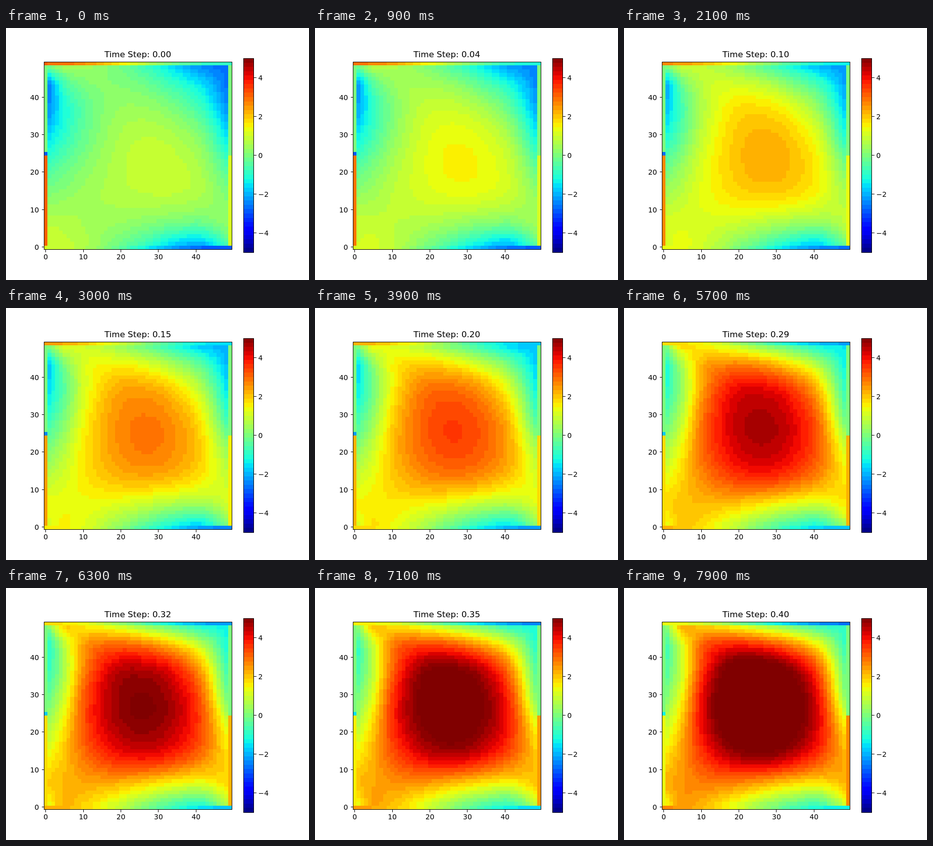
An HTML page with a canvas that plays this animation: 600x500 px, repeating every 8 s.

```html
<!DOCTYPE html>
<html lang="en">
<head>
<meta charset="utf-8">
<title>Heat map over time</title>
<style>
  html, body { margin: 0; width: 100%; height: 100%; overflow: hidden; background: #fff; }
  canvas, svg { position: absolute; left: 0; top: 0; }
  text { font: 13.89px "DejaVu Sans", sans-serif; }
  #title { font-size: 16.67px; text-anchor: middle; }
  path { fill: none; stroke: #000; shape-rendering: crispEdges; }
</style>
</head>
<body>
<canvas id="map" width="600" height="500"></canvas>
<svg id="axes" width="600" height="500">
  <path d="M75.5 67.5H447.5V439.5H75.5Z M470.5 60.5H490.5V445.5H470.5Z"/>
  <text id="title" x="261" y="58"></text>
</svg>
<script>
const SIZE = 50, CELL = 7.44, LEFT = 75, TOP = 67;
const STEP_MS = 100, STEPS = 80, DT = 0.005, END = 0.395;
const BANDS = 45;

// Interior values at the knots; rows run from the bottom up.
const KNOTS = [1, 4, 10, 18, 26, 34, 42, 48];
const ROWS = [1, 6, 13, 22, 30, 38, 44, 48];
const START_FIELD = [
  [0.95, 0.9, 0.65, 0, -0.7, -1.6, -1.9, -0.6],
  [0.75, 0.72, 0.55, 0.35, 0.1, -0.2, -0.3, 0.2],
  [0.2, 0.27, 0.47, 0.6, 0.7, 0.7, 0.5, 0.1],
  [-0.7, -0.4, 0.1, 0.62, 0.95, 0.88, 0.42, -0.6],
  [-1.6, -1.1, -0.3, 0.45, 0.75, 0.58, -0.1, -1.5],
  [-2.3, -1.4, -0.4, 0.25, 0.3, -0.1, -1, -2.3],
  [-2.2, -0.9, 0, 0.1, -0.2, -0.9, -1.7, -2.6],
  [-0.2, 0.3, 0.4, 0, -0.7, -1.6, -2.4, -2.7]
];
const END_FIELD = [
  [1.5, 2.4, 2.2, 1.4, 0.5, -0.2, -0.5, 1],
  [2.2, 2.45, 2.7, 2.6, 2.2, 1.7, 1.5, 2.1],
  [1.8, 2.3, 3.4, 4.4, 4.7, 4.2, 3.2, 2.2],
  [0.9, 1.8, 4, 5.5, 5.95, 5.4, 3.9, 1.6],
  [0.1, 1.1, 3.9, 5.7, 6.1, 5.5, 3.6, 0.3],
  [-0.5, 0.6, 3.3, 5.15, 5.35, 4.6, 2.6, -0.3],
  [-0.5, 0.9, 2.9, 3.5, 3.25, 2.4, 1, -0.8],
  [0.2, 1.9, 2, 1.6, 0.9, 0.2, -0.7, -1]
];

// Cubic Hermite curve through unevenly spaced points.
function spline(xs, vs, x) {
  const last = xs.length - 1;
  let i = 0;
  while (i < last - 1 && x > xs[i + 1]) i++;
  const slope = j => (vs[j + 1] - vs[j]) / (xs[j + 1] - xs[j]);
  const tangent = j => {
    if (j === 0) return slope(0);
    if (j === last) return slope(last - 1);
    const a = xs[j] - xs[j - 1], b = xs[j + 1] - xs[j];
    return (slope(j - 1) * b + slope(j) * a) / (a + b);
  };
  const h = xs[i + 1] - xs[i], s = (x - xs[i]) / h, r = 1 - s;
  return r * r * ((1 + 2 * s) * vs[i] + s * h * tangent(i)) +
         s * s * ((1 + 2 * r) * vs[i + 1] - r * h * tangent(i + 1));
}

function expand(field) {
  return Array.from({ length: SIZE }, (_, y) =>
    Array.from({ length: SIZE }, (_, x) =>
      spline(ROWS, field.map(row => spline(KNOTS, row, x)), y)));
}
const first = expand(START_FIELD), final = expand(END_FIELD);

function valueAt(x, y, t) {
  const wave = 2 * Math.cos(Math.PI * x / (SIZE - 1));
  if (y === SIZE - 1) return 1 + wave - 4 * t;
  if (y === 0) return -1 + wave + 4 * t;
  if (x === 0) return y < 25 ? 3 - 4 * t : y === 25 ? -3 + 4 * t : 0;
  if (x === SIZE - 1) return y < 25 ? 1 + 4 * t : 0;
  return first[y][x] + (final[y][x] - first[y][x]) * t / END;
}

// Piecewise linear rainbow from dark blue to dark red.
function jet(n) {
  const ramp = (a, b) => Math.max(0, Math.min(1, (n - a) / (b - a)));
  const r = ramp(0.35, 0.66) - 0.5 * ramp(0.89, 1);
  const g = ramp(0.125, 0.375) - ramp(0.64, 0.91);
  const b = 0.5 + 0.5 * ramp(0, 0.11) - ramp(0.34, 0.65);
  return `rgb(${[r, g, b].map(c => Math.round(255 * Math.max(0, c)))})`;
}
const palette = Array.from({ length: BANDS }, (_, i) => jet((i + 0.5) / BANDS));

function colour(v) {
  if (v >= 5) return jet(1);
  return palette[Math.max(0, Math.floor((v + 5) / 10 * BANDS))];
}

const ctx = document.getElementById("map").getContext("2d");
const axes = document.getElementById("axes");
const title = document.getElementById("title");

function box(x0, y0, x1, y1, fill) {
  const [a, b, c, d] = [x0, y0, x1, y1].map(Math.round);
  ctx.fillStyle = fill;
  ctx.fillRect(a, b, c - a, d - b);
}

function add(name, attrs, content = "") {
  const el = document.createElementNS("http://www.w3.org/2000/svg", name);
  for (const key in attrs) el.setAttribute(key, attrs[key]);
  el.textContent = content;
  axes.append(el);
}

function label(x, y, anchor, content) {
  add("text", { x, y, "text-anchor": anchor }, content);
}

function drawAxes() {
  for (let n = 0; n < SIZE; n += 10) {
    const offset = (n + 0.5) * CELL;
    const x = Math.floor(LEFT + offset) + 0.5;
    const y = Math.floor(438.5 - offset) + 0.5;
    add("path", { d: `M${x} 440v4.5M75 ${y}h-4.5` });
    label(LEFT + offset, 459, "middle", n);
    label(65.3, y + 5.3, "end", n);
  }
  for (let v = -4; v <= 4; v += 2) {
    const y = 252.5 - 38.5 * v;
    add("path", { d: `M491 ${y}h4.5` });
    label(499.5, y + 5.3, "start", String(v).replace("-", "\u2212"));
  }
  palette.forEach((fill, i) => {
    const h = 385 / BANDS;
    box(470, 445 - (i + 1) * h, 490, 445 - i * h, fill);
  });
}

function drawStep(step) {
  const t = step * DT;
  for (let y = 0; y < SIZE; y++) {
    const top = TOP + (SIZE - 1 - y) * CELL;
    for (let x = 0; x < SIZE; x++) {
      const left = LEFT + x * CELL;
      box(left, top, left + CELL, top + CELL, colour(valueAt(x, y, t)));
    }
  }
  // The exact tie at 0.125 rounds to even.
  const shown = t === 0.125 ? "0.12" : t.toFixed(2);
  title.textContent = "Time Step: " + shown;
}

drawAxes();
const begin = performance.now();
let current = -1;
function tick() {
  const elapsed = Math.max(0, performance.now() - begin);
  const step = Math.floor(elapsed / STEP_MS) % STEPS;
  if (step !== current) drawStep(current = step);
  requestAnimationFrame(tick);
}
tick();
</script>
</body>
</html>
```
